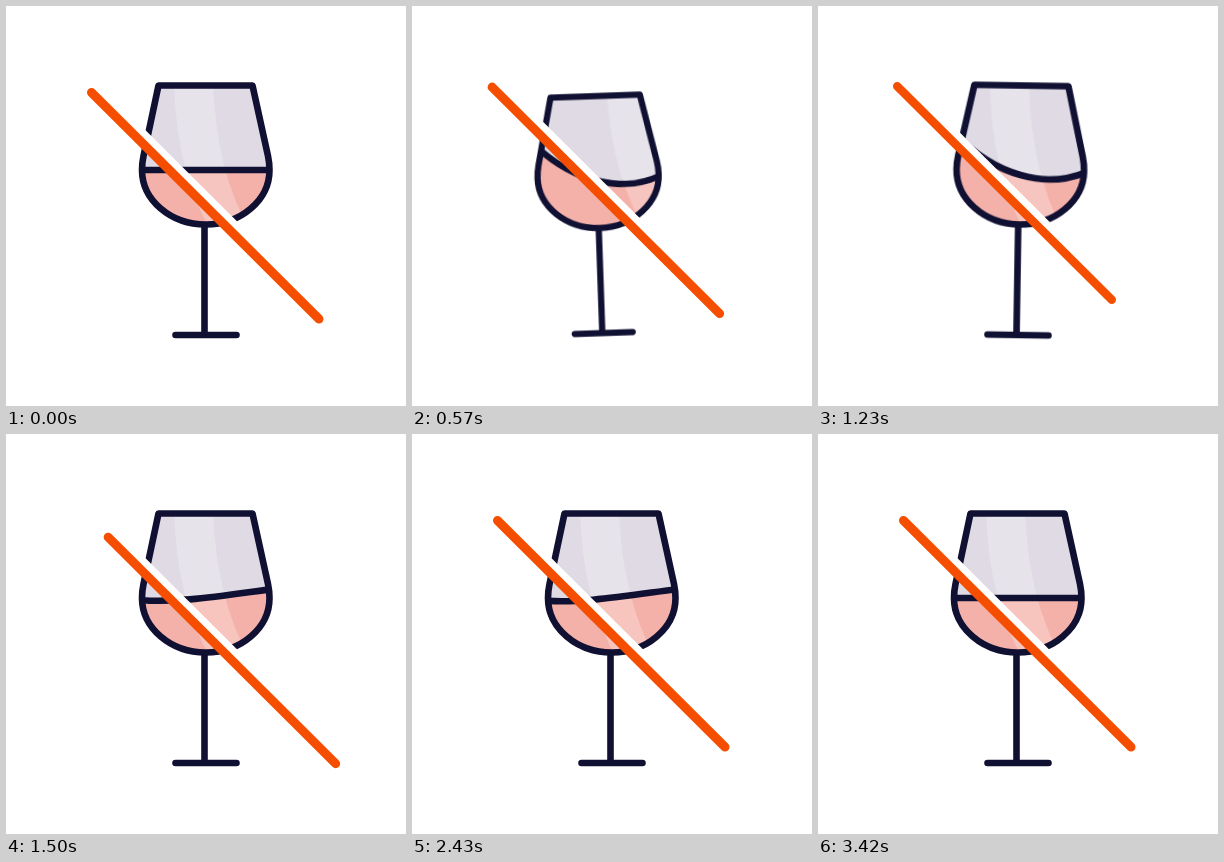
These frames come from a looping animation (400 px wide and 400 px high, 4130 ms). An HTML page without scripts:

```html
<!DOCTYPE html>
<html lang="en">
<head>
<meta charset="utf-8">
<title>No wine</title>
<style>
  html, body { margin: 0; width: 100%; height: 100%; overflow: hidden; background: #fff; }
  svg { display: block; width: 100vw; height: 100vh; }

  /* Surface poses of the wine, from flat to fully piled up on one side. */
  :root {
    --flat: path("M126 164C170 164 230 164 274 164V230H126Z");
    --left: path("M126 120C170 171 230 186 274 161V230H126Z");
    --right: path("M126 186C170 172 230 206 274 45V230H126Z");
    --ripple-left: path("M126 152C170 142 230 183 274 174V230H126Z");
    --ripple-right: path("M126 166C170 171 230 159 274 154V230H126Z");
  }
  @property --slide { syntax: "<length>"; inherits: false; initial-value: 0px; }

  .glass, .shine, .wine, .bar { animation: 4130ms ease-in-out infinite; }
  .glass { animation-name: sway; transform-origin: 199.5px 329px; }
  .shine { animation-name: glint; fill: #fff; opacity: .25; }
  .wine { animation-name: slosh; fill: #f4b1a9; }
  .bar {
    animation-name: slash;
    transform: translate(var(--slide), var(--slide)) scale(var(--stretch, 1));
    transform-origin: 199px 199.5px;
    stroke: #f54e00;
    stroke-width: 9;
  }
  .ink { stroke: #101033; stroke-width: 6.6; }
  .line { fill: none; stroke-linecap: round; stroke-linejoin: round; }
  .surface { fill: none; }

  @keyframes sway {
    0%, 32%, 100% { transform: none; }
    9.7% { transform: translate(-43px, -1px) rotate(-5.7deg) scale(.95); animation-timing-function: ease-in; }
    13.8% { transform: translate(-8.5px, -2px) rotate(-2deg) scale(.95); animation-timing-function: ease-out; }
    22.5% { transform: translate(43.5px, -2px) rotate(5.7deg) scale(.99); }
    29.8% { transform: rotate(.9deg); }
  }

  @keyframes glint {
    0%, 29.8%, 100% { transform: none; }
    13.8% { transform: translateX(44px); }
    22.5% { transform: translateX(-36px); }
  }

  @keyframes slosh {
    0%, 83%, 100% { d: var(--flat); }
    4.6%, 37%, 58.8% { d: var(--ripple-right); }
    9.7%, 13.8%, 29.8% { d: var(--left); }
    22.5% { d: var(--right); }
    44.3% { d: var(--ripple-left); }
  }

  /* Two damped swings along the diagonal, then rest. */
  @keyframes slash {
    0%, 22.5%, 26.15%, 48.7%, 100% { --slide: 0px; scale: 1; }
    3.63%, 29.78% { --slide: -13.5px; scale: .943; }
    5.8%, 32% { --slide: -34px; scale: 1; }
    9.7%, 35.8% { --slide: 18px; }
    13.1%, 39.25% { --slide: -9px; }
    15.5%, 41.65% { --slide: 10px; }
    20.1%, 46.25% { --slide: -2px; }
  }
</style>
</head>
<body>
<svg viewBox="0 0 400 400" role="img" aria-label="Wine glass crossed out">
  <defs>
    <path id="bowl" d="M152.5 79.5H246.5L262 150Q263.5 157 263.5 164A63.75 54.5 0 0 1 136 164Q136 157 137.5 150Z"/>
    <clipPath id="inside"><use href="#bowl"/></clipPath>
  </defs>
  <g class="glass">
    <path class="ink line" d="M198.5 219V329M169.5 329H230.5"/>
    <g clip-path="url(#inside)">
      <rect x="126" y="70" width="148" height="155" fill="#dfdae4"/>
      <path class="wine" d="M126 164H274V230H126Z"/>
      <path class="shine" d="M168 76Q170 165 205 225H244Q210 165 207 76Z"/>
      <path class="wine ink surface" d="M126 164H274V230H126Z"/>
    </g>
    <use class="ink line" href="#bowl"/>
  </g>
  <path d="M85.5 86.5L313 313" transform="translate(4.2 -4.2)" stroke="#fff" stroke-width="11"/>
  <path class="bar line" d="M85.5 86.5L313 313"/>
</svg>
</body>
</html>
```
